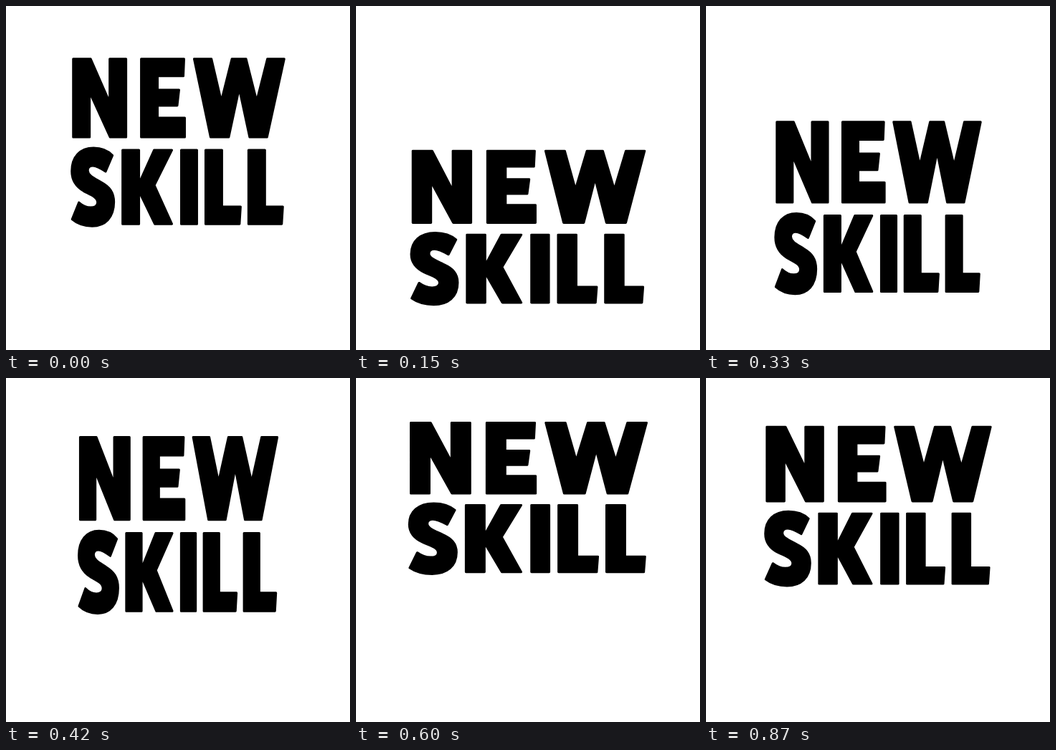
These frames come from a looping animation (480x480 px, 0.9 s). An HTML page:

```html
<!DOCTYPE html>
<html lang="en">
<head>
<meta charset="utf-8">
<title>New skill</title>
<style>
  html, body { margin: 0; height: 100%; overflow: hidden; background: #fff; }
  svg { display: block; width: 100%; height: 100%; }
  path { stroke: #000; stroke-width: 3; stroke-linejoin: round; }
</style>
</head>
<body>
<svg viewBox="0 0 480 480" role="img" aria-label="NEW SKILL">
  <g id="words">
    <path d="M93.5 73.5H118L144.5 134V73.5H167.5V182.5H145L116.5 120V182.5H93.5Z"/>
    <path d="M188.5 73.5H248.5L247.5 97.5H211.5V116.5H241.5L239 138.5H211.5V155.5H249.5V182.5H188.5Z"/>
    <path d="M262.5 73.5H286.8L300.5 132L315.2 73.5H335.2L350 132L364.8 73.5H388.5L364.5 182.5H340L325.5 115L311 182.5H285.5Z"/>
    <path d="M148.5 208L138.8 230.5C132 226 126 222.5 121 222.5C116 222.5 114 226 114 229C114 236 124 240 133 245.5C144 251.5 150.5 259 150.5 273C150.5 295 138 306.5 120 306.5C109 306.5 99 303 92 297L101.5 273.5C106 277.5 112 280.5 118 280.5C124 280.5 127.5 277.5 127.5 273.5C127.5 266 117 262.5 108.5 258C98 252 91.5 243.5 91.5 230C91.5 210 103 197.5 122 197.5C133 197.5 142 201 148.5 208Z"/>
    <path d="M162.5 200.5H185.5V247L206.5 200.5H231.5L207 249.5L231.5 303.5H207.5L185.5 258V303.5H162.5Z"/>
    <path d="M244.5 200.5H266.5V303.5H244.5Z"/>
    <path d="M278.5 200.5H301.5V279.5H327.5L326 303.5H278.5Z"/>
    <path d="M338.5 200.5H361.5V279.5H386.5L385 303.5H338.5Z"/>
  </g>
</svg>
<script>
const LOOP = 900;
const PIVOT = { x: 241, y: 188.5 };
const words = document.getElementById('words');

// Bounce poses: [time in ms, centre y, horizontal stretch]
const poses = [
  [0, 188.5, 1], [60, 230, 0.928], [150, 307.5, 1.094], [225, 339, 1.262],
  [270, 327.3, 1.203], [330, 281, 0.966], [375, 240, 0.925], [420, 204.5, 0.933],
  [480, 179, 1.02], [540, 168.7, 1.09], [600, 166.6, 1.114], [630, 166.4, 1.118],
  [780, 168.5, 1.1], [870, 177.5, 1.059]
];

function pose(i) {
  const n = poses.length;
  const [t, ...values] = poses[(i + n) % n];
  return [t + Math.floor(i / n) * LOOP, ...values];
}

function slope(i, k) {
  const a = pose(i), b = pose(i + 1);
  return (b[k] - a[k]) / (b[0] - a[0]);
}

// Harmonic mean keeps the curve free of overshoot; turning points are flat
function tangent(i, k) {
  const a = slope(i - 1, k), b = slope(i, k);
  return a * b > 0 ? 2 * a * b / (a + b) : 0;
}

function sample(t, k) {
  const i = poses.findLastIndex(p => p[0] <= t);
  const a = pose(i), b = pose(i + 1);
  const d = b[0] - a[0], u = (t - a[0]) / d, v = 1 - u;
  return v * v * (1 + 2 * u) * a[k] + u * u * (1 + 2 * v) * b[k]
    + d * u * v * (v * tangent(i, k) - u * tangent(i + 1, k));
}

function draw(now) {
  const t = now % LOOP;
  const sx = sample(t, 2), sy = 1 - 0.82 * (sx - 1);
  words.setAttribute('transform',
    `translate(${PIVOT.x} ${sample(t, 1)}) scale(${sx} ${sy}) translate(${-PIVOT.x} ${-PIVOT.y})`);
}

function tick() {
  draw(performance.now());
  requestAnimationFrame(tick);
}
tick();
</script>
</body>
</html>
```
